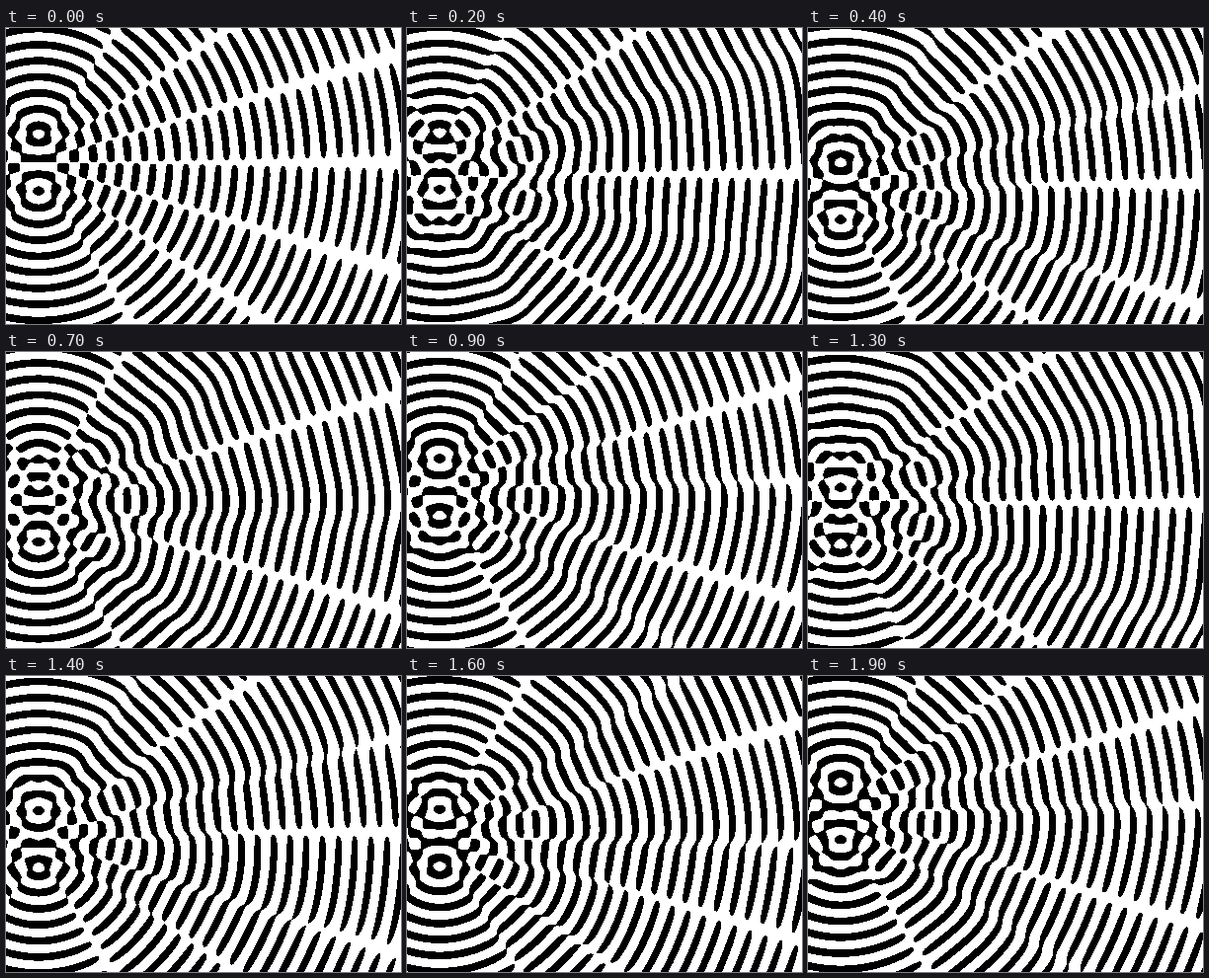
Write an HTML page with a canvas that moves like this. It is 400x300 px and loops after 2 s.

```html
<!DOCTYPE html>
<html lang="en">
<head>
<meta charset="utf-8">
<title>Wave interference</title>
<style>
  html, body { margin: 0; width: 100%; height: 100%; overflow: hidden; background: #fff; }
  canvas { display: block; width: 400px; height: 300px; }
</style>
</head>
<body>
<canvas id="stage" width="400" height="300"></canvas>
<script>
const W = 400, H = 300;
const LOOP = 2000, STEP = 100;
const SOURCES = 4, CENTER_X = 33, CENTER_Y = 150.5, SPACING = 28.3;
const WAVELENGTH = 16.25, THRESHOLD = 0.025;
const K = 2 * Math.PI / WAVELENGTH;

const ctx = document.getElementById('stage').getContext('2d');
const image = ctx.createImageData(W, H);
const pixels = new Uint32Array(image.data.buffer);
const BLACK = 0xff000000, WHITE = 0xffffffff;

// Circular standing wave, fading with the square root of distance
function ripple(r) {
  const lag = 0.65 * r / (r + 3);
  return Math.cos(K * r - lag) / Math.sqrt(1 + 1.57 * K * r);
}

function makeField(index) {
  const sourceY = CENTER_Y + (index - (SOURCES - 1) / 2) * SPACING;
  const field = new Float32Array(W * H);
  for (let y = 0, p = 0; y < H; y++) {
    for (let x = 0; x < W; x++, p++) {
      field[p] = ripple(Math.hypot(x + 0.5 - CENTER_X, y + 0.5 - sourceY));
    }
  }
  return field;
}

const fields = Array.from({ length: SOURCES }, (_, i) => makeField(i));

// Each source swings a quarter cycle behind the one above it
function draw(time) {
  const angle = 2 * Math.PI * time / LOOP;
  const [a, b, c, d] = fields.map((_, i) => -Math.cos(angle - i * Math.PI / 2));
  const [fa, fb, fc, fd] = fields;
  for (let p = 0; p < pixels.length; p++) {
    const sum = a * fa[p] + b * fb[p] + c * fc[p] + d * fd[p];
    pixels[p] = sum > THRESHOLD ? BLACK : WHITE;
  }
  ctx.putImageData(image, 0, 0);
}

let shown = -1;
const start = performance.now();

function tick() {
  const elapsed = (performance.now() - start) % LOOP;
  const step = Math.floor(elapsed / STEP);
  if (step !== shown) {
    shown = step;
    draw(step * STEP);
  }
  requestAnimationFrame(tick);
}
tick();
</script>
</body>
</html>
```
